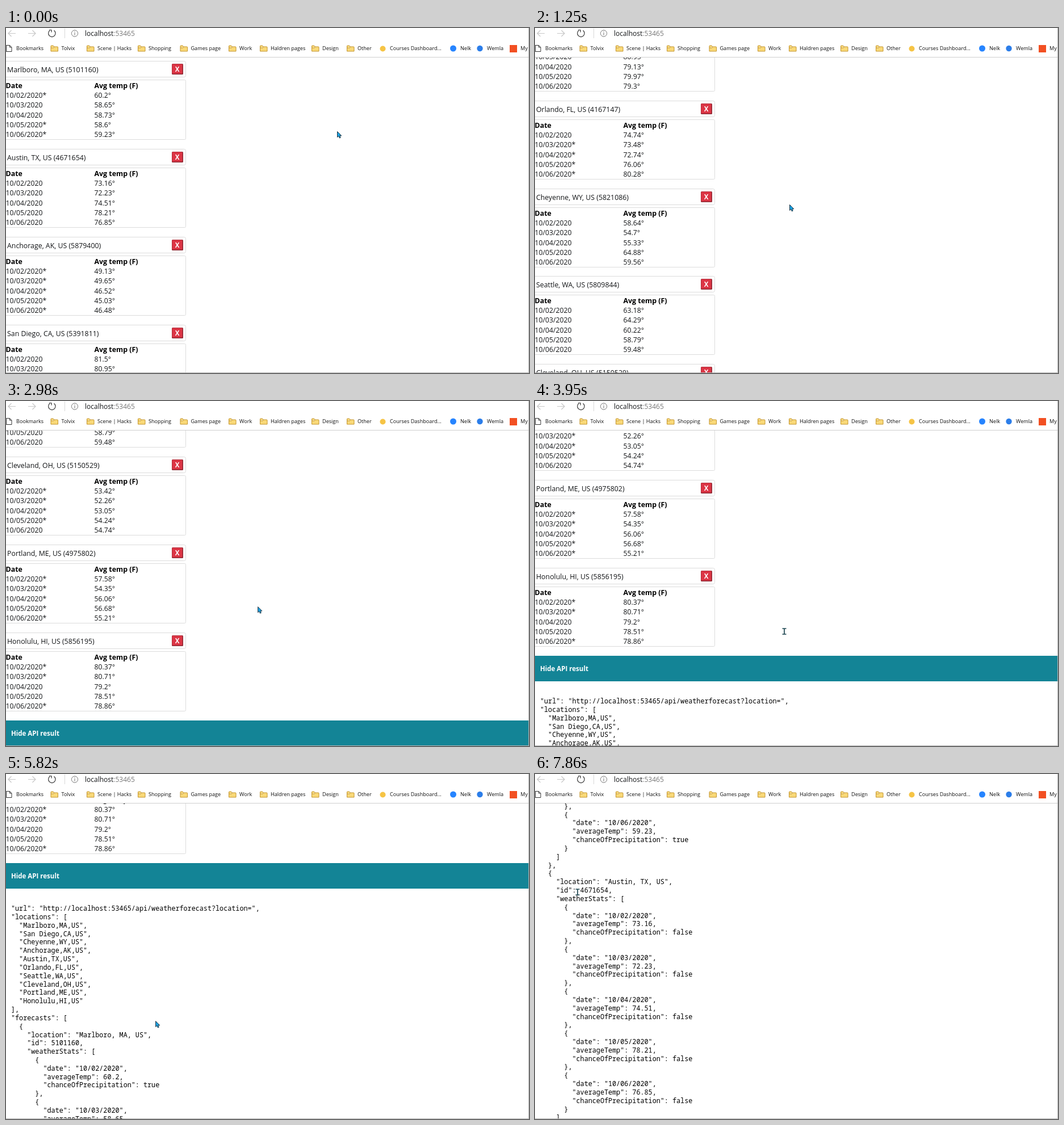
These frames come from a looping animation (921 by 608 pixels, 8000 ms). An HTML page:

```html
<!DOCTYPE html>
<html lang="en">
<head>
<meta charset="utf-8">
<title>Weather forecast</title>
<style>
  /* An integer property keeps the scrolled page on whole pixels. */
  @property --scroll { syntax: "<integer>"; inherits: false; initial-value: 0; }

  html, body { margin: 0; width: 100%; height: 100%; overflow: hidden; background: #fff; }
  svg { display: block; width: 921px; height: 608px; font: 12.25px "Open Sans", "Noto Sans", sans-serif; fill: #141618; }
  .title { font-size: 12.35px; }
  .head { font-weight: 700; font-size: 12.4px; fill: #000; }
  .box { fill: #fff; stroke: #dcdcdc; }
  .close { font-weight: 700; font-size: 11.5px; fill: #fff; text-anchor: middle; }
  .toggle { font-weight: 700; font-size: 11.5px; fill: #fff; }
  .code { font: 11.77px "Noto Sans Mono", "DejaVu Sans Mono", monospace; fill: #000; white-space: pre; }
  .mark { font-size: 9.1px; fill: #111; }
  .icon { fill: none; stroke: #333; stroke-width: 1.2; }
  .faint { stroke: #c8c8c8; }

  #page { transform: translateY(calc(var(--scroll) * -1px)); animation: scroll 8s linear infinite; }
  #pointer { animation: point 8s ease-in-out infinite; }
  #arrow { animation: arrow 8s step-end infinite; }
  #beam { animation: beam 8s step-end infinite; }

  @keyframes scroll {
    0%, 1.225% { --scroll: 0; }
    28.575%, 47.5375% { --scroll: 1044; }
    60.125% { --scroll: 1818; }
    61.25% { --scroll: 1818; animation-timing-function: ease-in-out; }
    74.5% { --scroll: 1437; }
    80.5% { --scroll: 1437; animation-timing-function: cubic-bezier(.333, .667, .667, 1); }
    98.25%, 100% { --scroll: 2179; }
  }
  @keyframes point {
    0% { transform: translate(583px, 182px); }
    14% { transform: translate(448px, 311px); }
    26.375% { transform: translate(448px, 309px); }
    47%, 50% { transform: translate(439px, 406px); }
    60.125% { transform: translate(438.5px, 402.5px); }
    77.5%, 80.5% { transform: translate(231px, 441px); }
    97%, 100% { transform: translate(75px, 208px); }
  }
  @keyframes arrow {
    0%, 52% { opacity: 1; }
    48.5%, 97%, 100% { opacity: 0; }
  }
  @keyframes beam {
    0%, 52% { opacity: 0; }
    48.5%, 97%, 100% { opacity: 1; }
  }
</style>
</head>
<body>
<svg viewBox="0 0 921 608">
  <g id="page"></g>
  <g id="chrome">
    <rect width="921" height="51" fill="#fff"/>
    <path d="M0 51.5H921" stroke="#cfcfcf"/>
    <path class="icon faint" d="M17 9.5H4M9.5 4L4 9.5L9.5 15M39 9.5H52M46.5 4L52 9.5L46.5 15"/>
    <path class="icon" d="M77 4.5A6.2 6.2 0 1 0 84.5 4.3M76 3.5H80V7.5"/>
    <path d="M103.5 1V18" stroke="#d8d8d8"/>
    <circle class="icon" cx="121" cy="9.5" r="5.6" style="stroke:#777;stroke-width:1"/>
    <path d="M121 8.5V12.5M121 6.2V7.4" stroke="#666"/>
    <text x="139" y="14" style="font-size:12px">localhost<tspan fill="#777">:53465</tspan></text>
    <path class="icon" style="stroke-width:1" d="M.5 30.5H6.5L10 34V41.5H.5ZM6.5 30.5V34H10"/>
    <circle cx="663.5" cy="36.5" r="5" fill="#f6c445"/>
    <circle cx="787.5" cy="36" r="5.5" fill="#2684ff"/>
    <circle cx="834.5" cy="36" r="5.2" fill="#2b7de9"/>
    <rect x="887" y="30" width="13" height="13" fill="#f25022"/>
  </g>
  <path d="M920.5 0V608M0 607.5H921" stroke="#b4b4b4"/>
  <g id="pointer">
    <path id="arrow" d="M.5 .5V10.5L2.8 8.5L4.400 12L6.2 11.2L4.7 7.9H7.8Z" fill="#1ba6e8" stroke="#10202c" stroke-width=".9"/>
    <path id="beam" d="M-3.5 -5H3.5M-3.5 5H3.5M0 -5V5" fill="none" stroke="#1d4650" stroke-width="1.7"/>
  </g>
</svg>
<script>
const $ = id => document.getElementById(id);
const text = (x, y, str, cls = '') => `<text x="${x}" y="${y}" class="${cls}">${str}</text>`;

// City | id | daily averages; an asterisk means precipitation is likely.
const cities = `Marlboro, MA|5101160|60.2* 58.65 58.73 58.6* 59.23*
Austin, TX|4671654|73.16 72.23 74.51 78.21 76.85
Anchorage, AK|5879400|49.13* 49.65* 46.52* 45.03* 46.48*
San Diego, CA|5391811|81.5 80.95 79.13 79.97 79.3
Orlando, FL|4167147|74.74 73.48* 72.74* 76.06* 80.28*
Cheyenne, WY|5821086|58.64 54.7 55.33 64.88 59.56
Seattle, WA|5809844|63.18 64.29 60.22 58.79 59.48
Cleveland, OH|5150529|53.42* 52.26* 53.05* 54.24* 54.74
Portland, ME|4975802|57.58* 54.35* 56.06* 56.68* 55.21*
Honolulu, HI|5856195|80.37* 80.71* 79.2 78.51 78.86*`.split('\n').map(line => {
  const [name, id, days] = line.split('|');
  return {
    location: name + ', US',
    id: +id,
    weatherStats: days.split(' ').map((day, i) => ({
      date: `10/0${i + 2}/2020`,
      averageTemp: parseFloat(day),
      chanceOfPrecipitation: day.endsWith('*')
    }))
  };
});

const CARD_PITCH = 154.9, ROW = 17.37, CODE_LINE = 14.83, CODE_CHAR = 7.06;

function card({ location, id, weatherStats }, i) {
  const rows = weatherStats.map((day, n) => {
    const y = 123 + n * ROW;
    return text(-.5, y, day.date + (day.chanceOfPrecipitation ? '*' : '')) +
      text(155.5, y, day.averageTemp + '°');
  }).join('');
  return `<g transform="translate(0 ${Math.round(i * CARD_PITCH)})">
    <rect class="box" x="-8.5" y="58.5" width="325" height="28" rx="3"/>
    ${text(2, 77.5, `${location} (${id})`, 'title')}
    <rect x="292" y="63" width="20" height="19" rx="1.5" fill="#8f2a35"/>
    <rect x="292.5" y="63.5" width="18" height="17" rx="1" fill="#dc3545"/>
    ${text(301.5, 77, 'X', 'close')}
    <rect class="box" x="-8.5" y="91.5" width="325" height="105" rx="2"/>
    ${text(-.5, 105.7, 'Date', 'head')}${text(155.5, 105.7, 'Avg temp (F)', 'head')}
    ${rows}</g>`;
}

function apiResult() {
  const requested = ['Marl', 'San', 'Chey', 'Anch', 'Aus', 'Orl', 'Sea', 'Clev', 'Port', 'Hon'];
  const find = start => cities.find(city => city.location.startsWith(start));
  const result = {
    url: 'http://localhost:53465/api/weatherforecast?location=',
    locations: requested.map(start => find(start).location.replace(/, /g, ',')),
    forecasts: cities
  };
  return JSON.stringify(result, null, 2).split('\n').slice(1, -1).map((line, i) => {
    const str = line.trimStart();
    const indent = line.length - str.length - 2;
    return text(9 + indent * CODE_CHAR, (1691 + i * CODE_LINE).toFixed(1), str, 'code');
  }).join('');
}

$('page').innerHTML = cities.map(card).join('') +
  '<rect y="1607" width="921" height="45" fill="#138496"/>' +
  text(9, 1634, 'Hide API result', 'toggle') + apiResult();

const folder = x => `<path transform="translate(${x} 30.5)" fill="#f9d978" stroke="#c3942f"
  d="M.5 10.5V1.5Q.5 .5 1.5 .5H4.5L6 2.5H12Q13 2.5 13 3.5V10.5ZM.5 4.5H5L6.5 2.5"/>`;
const folders = [[97.5, 'Tolvix'], [161, 'Scene | Hacks'], [251, 'Shopping'], [325.5, 'Games page'],
  [411, 'Work'], [466, 'Haldren pages'], [557, 'Design'], [619, 'Other']];
const links = [[18, 'Bookmarks'], [676, 'Courses Dashboard...'], [800, 'Nelk'], [847, 'Wemla'], [906, 'My']];
$('chrome').insertAdjacentHTML('beforeend',
  folders.map(([x]) => folder(x - 19)).join('') +
  [...folders, ...links].map(([x, str]) => text(x, 39.3, str, 'mark')).join(''));
</script>
</body>
</html>
```
